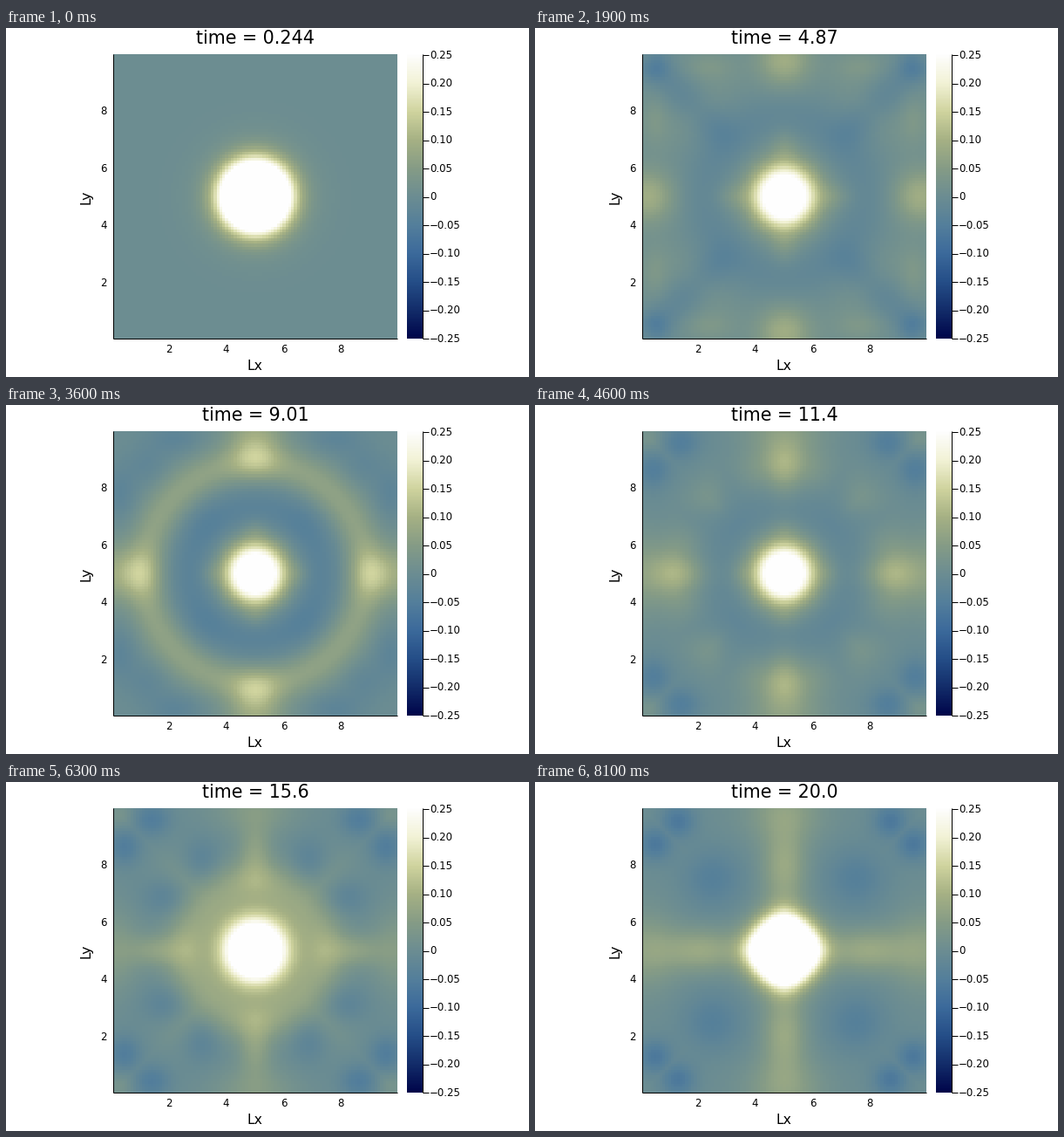
Write a matplotlib script that moves like this. It is 600 px wide and 400 px high and loops after 8.2 s.

```python
import numpy as np
import matplotlib.pyplot as plt
from matplotlib.animation import FuncAnimation
from matplotlib.colors import LinearSegmentedColormap

FRAMES, INTERVAL, TIME_STEP = 82, 100, 0.2436
LEFT, RIGHT, TOP, BOTTOM = 123, 449, 30, 356
PX_PER_UNIT = (RIGHT - LEFT) / 9.9
LIMIT = 0.25

plt.rcParams["font.family"] = "DejaVu Sans"
cmap = LinearSegmentedColormap.from_list("navy_to_white", [
    "#00054a", "#132d6a", "#254e88", "#3c6a9b", "#547f9b", "#6c8d92",
    "#869c86", "#a6b184", "#d0d49f", "#f2f2d6", "#fefefe"], N=256)

# Grid centred on the pulse; all fields are symmetric about axes and diagonals.
coords = (np.arange(99) + 1) * 0.1 - 5
ax_, ay_ = np.abs(np.meshgrid(coords, coords))
radius = np.hypot(ax_, ay_)
along, across = (ax_ + ay_) / np.sqrt(2), (ax_ - ay_) / np.sqrt(2)


def core(amp, width, power=2.0):
    rho = (ax_**power + ay_**power) ** (1 / power)
    return amp * np.exp(-(rho / width) ** 2)


def ring(amp, r, width):
    return amp * np.exp(-((radius - r) / width) ** 2)


def spots(amp, x, y, sx, sy):
    g = np.exp(-((ax_ - x) / sx) ** 2 - ((ay_ - y) / sy) ** 2)
    return amp * np.maximum(g, g.T)


def diagonal(amp, p, s_along, s_across):
    return amp * np.exp(-((along - p) / s_along) ** 2 - (across / s_across) ** 2)


def wall(amp, x, width, reach):
    g = np.exp(-((ax_ - x) / width) ** 2 - (ay_ / reach) ** 4)
    return amp * np.maximum(g, g.T)


def plateau(amp, size):
    return amp * np.exp(-(ax_ / size) ** 8 - (ay_ / size) ** 8)


# Stages of the wave: (frame, field).
stages = [
    (0, core(0.9, 1.05) + core(0.025, 2.1)),
    (11, core(0.43, 0.96) + ring(-0.036, 2.8, 0.85) + spots(0.025, 1.7, 0, 0.6, 0.4)
        + spots(0.36, 5, 0, 0.9, 0.92) + diagonal(0.037, 4.35, 0.7, 3.2)),
    (27, core(1.1, 1.05, 1.85) + spots(0.05, 1.8, 0, 0.8, 0.7)
        + diagonal(-0.055, 3.3, 1.15, 0.65) + diagonal(-0.03, 5.1, 1.0, 0.6)
        + spots(-0.055, 4.5, 4.45, 0.55, 0.5)
        + spots(0.037, 2.6, 4.5, 0.8, 0.5) + 0.006),
    (36, core(0.43, 0.95) + ring(-0.036, 2.25, 0.9) + diagonal(-0.01, 2.5, 0.7, 0.8)
        + spots(0.02, 1.5, 0, 0.4, 0.4)
        + ring(0.066, 3.85, 0.72) + spots(0.09, 4.15, 0, 0.72, 0.85)
        + spots(0.055, 5, 0, 0.5, 1.1) + spots(-0.03, 4.7, 2.8, 0.55, 0.9)
        + spots(-0.022, 3.8, 3.8, 0.7, 0.7)),
    (56, core(0.235, 1.75) + spots(0.085, 3.3, 0, 1.0, 0.55)
        + spots(0.055, 4.8, 0, 0.9, 1.4)
        + spots(-0.055, 3.05, 1.85, 0.75, 0.65)
        + spots(-0.055, 4.55, 3.6, 0.6, 0.65)
        + spots(0.025, 4.7, 4.7, 0.45, 0.45)),
    (72, core(0.55, 1.02) + plateau(0.03, 3.35)
        + wall(-0.04, 4.7, 0.95, 3.4) + spots(-0.012, 4.6, 2.6, 0.5, 0.7)
        + spots(0.042, 2.55, 0, 0.55, 0.9) + spots(0.055, 2.9, 2.9, 0.85, 0.85)
        + diagonal(0.02, 5.2, 0.8, 0.8) + spots(0.08, 4.6, 4.6, 0.7, 0.7)),
    (81, core(0.95, 1.03, 1.65) + spots(0.08, 2.9, 0, 1.4, 0.75)
        + spots(0.06, 4.8, 0, 1.0, 1.3) + spots(-0.045, 2.5, 2.5, 1.05, 1.0)
        + spots(-0.065, 4.5, 3.7, 0.6, 0.6)),
]


def smooth(f):
    f = np.clip(f, 0, 1)
    return f * f * (3 - 2 * f)


def field(frame):
    """Sweep each stage into the next, alternately outwards and inwards."""
    for i, ((start, old), (end, new)) in enumerate(zip(stages, stages[1:])):
        if frame <= end:
            break
    f = (frame - start) / (end - start)
    delay = radius / 7.1
    if i % 2:
        return old + (new - old) * smooth(2 * f - 1 + delay)
    crest = ring(0.04 * np.sin(np.pi * f) ** 2, 0.8 + 3.4 * f, 0.8)
    return old + (new - old) * smooth(2 * f - delay) + crest


fig = plt.figure(figsize=(6, 4), dpi=100, facecolor="white")
ax = fig.add_axes([0, 0, 1, 1])
ax.axis("off")


def label(x, y, text, px, ha="center", **kw):
    return ax.text(x, y, text, fontsize=px * 0.72, ha=ha, va="baseline", **kw)


def line(xs, ys):
    ax.plot(xs, ys, color="black", lw=0.72, solid_capstyle="butt")


image = ax.imshow(field(0), cmap=cmap, vmin=-LIMIT, vmax=LIMIT, aspect="auto",
                  extent=(LEFT, RIGHT, BOTTOM, TOP), interpolation="nearest")
ax.imshow(np.linspace(1, 0, 256)[:, None], cmap=cmap, aspect="auto",
          extent=(460, 478, BOTTOM, TOP), interpolation="nearest")
line([LEFT, LEFT], [TOP, BOTTOM])
line([LEFT, RIGHT], [BOTTOM, BOTTOM])
line([478, 478], [TOP, BOTTOM])

for tick in (2, 4, 6, 8):
    offset = (tick - 0.05) * PX_PER_UNIT
    label(LEFT + offset - 0.5, 372, str(tick), 11.8)
    label(115.5, BOTTOM - offset + 4.5, str(tick), 11.8, ha="right")
for i, y in enumerate(np.linspace(TOP + 1, BOTTOM, 11)):
    value = (5 - i) * 0.05
    text = "0" if i == 5 else f"{value:.2f}".replace("-", "\u2212")
    line([478, 485], [y, y])
    label(486, y + 3.7, text, 11.8, ha="left")

label(285.5, 392, "Lx", 15.7)
label(96.5, 193.5, "Ly", 15.7, ha="center", rotation=90,
      rotation_mode="anchor")
title = label(286, 18, "", 20.7)
ax.set(xlim=(0, 600), ylim=(400, 0))


def update(frame):
    image.set_data(field(frame))
    title.set_text(f"time = {float(f'{TIME_STEP * (frame + 1):.3g}')}")
    return image, title


anim = FuncAnimation(fig, update, frames=FRAMES, interval=INTERVAL,
                     repeat=True, repeat_delay=0)
plt.show()
```
